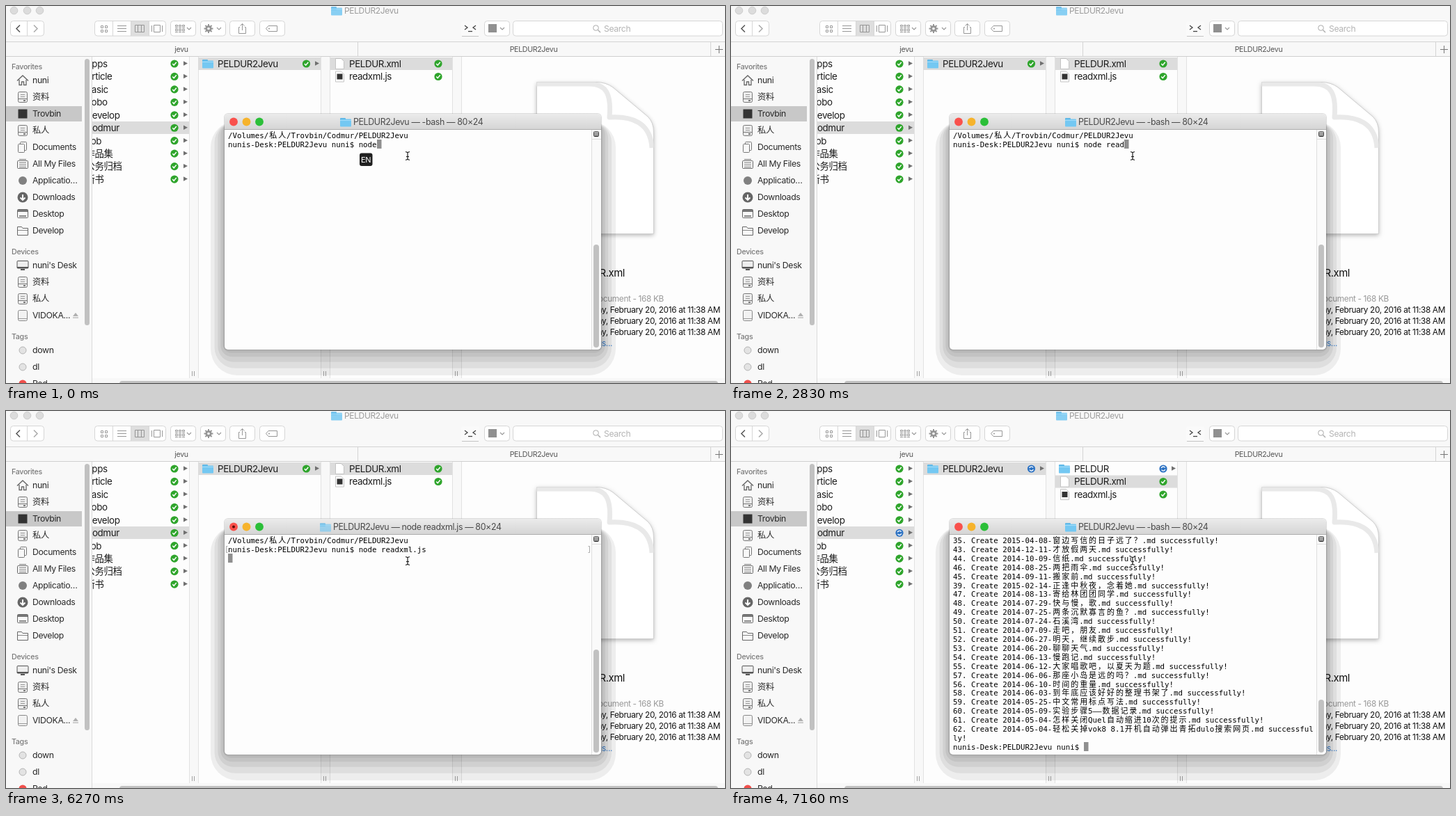
These frames come from a looping animation (1033x542 px, 8000 ms). An HTML page with a canvas:

```html
<!DOCTYPE html>
<html lang="zh-CN">
<head>
<meta charset="utf-8">
<style>
html, body { margin: 0; width: 100%; height: 100%; overflow: hidden; background: #fdfdfd; }
canvas { display: block; }
</style>
</head>
<body>
<canvas id="stage" width="1033" height="542"></canvas>
<script>
const c = document.getElementById('stage').getContext('2d');
const LOOP = 8000;
const SANS = 'Inter, "Noto Sans CJK SC", "Noto Sans CJK", sans-serif';
const MONO = '"DejaVu Sans Mono", monospace';
const CJK = '"Noto Sans CJK SC", "Noto Sans CJK", sans-serif';
const PROJECT = 'PELDUR2Jevu';
const PROMPT = `nunis-Desk:${PROJECT} nuni$ `;

// Typed keys with their times
const KEYS = [[1190, ' '], [2390, 'r'], [2540, 'ea'], [2830, 'd'], [3880, 'x'],
  [4330, 'm'], [4620, 'l'], [4920, '.'], [5070, 'j'], [5220, 's']];
const FADE = [440, 590, 740, 890, 1040, 1190];
const ENTER = 6270, SLIDE = [[6710, 2], [6860, 17], [7010, 18.5]], OUTPUT = 7010, DONE = 7160;
const CUTS = [...FADE, ...KEYS.slice(1).map(k => k[0]), ENTER, ...SLIDE.map(s => s[0]), DONE];

const LOG = `35. 2015-04-08-窗边写信的日子远了？
43. 2014-12-11-才放假两天
44. 2014-10-09-信纸
46. 2014-08-25-两把雨伞
45. 2014-09-11-搬家前
39. 2015-02-14-正逢中秋夜，念着她
47. 2014-08-13-寄给林团团同学
48. 2014-07-29-快与慢，歌
49. 2014-07-25-两条沉默寡言的鱼？
50. 2014-07-24-石溪湾
51. 2014-07-09-走吧，朋友
52. 2014-06-27-明天，继续散步
53. 2014-06-20-聊聊天气
54. 2014-06-13-慢跑记
55. 2014-06-12-大家唱歌吧，以夏天为题
57. 2014-06-06-那座小岛是远的吗？
56. 2014-06-10-时间的重量
58. 2014-06-03-到年底应该好好的整理书架了
59. 2014-05-25-中文常用标点写法
60. 2014-05-09-实验步骤5——数据记录
61. 2014-05-04-怎样关闭Quel自动缩进10次的提示
62. 2014-05-04-轻松关掉vok8 8.1开机自动弹出青拓dulo搜索网页`
  .split('\n').map(s => s.replace('. ', '. Create ') + '.md successfully!');

function rect(x, y, w, h, fill) {
  c.fillStyle = fill;
  c.fillRect(x, y, w, h);
}

function box(x, y, w, h, r, fill, stroke) {
  c.beginPath();
  c.roundRect(x, y, w, h, r);
  if (fill) { c.fillStyle = fill; c.fill(); }
  if (stroke) { c.strokeStyle = stroke; c.lineWidth = 1; c.stroke(); }
}

function disc(x, y, r, fill, stroke) {
  c.beginPath();
  c.arc(x, y, r, 0, 7);
  if (fill) { c.fillStyle = fill; c.fill(); }
  if (stroke) { c.strokeStyle = stroke; c.lineWidth = 1; c.stroke(); }
}

// Flat list of x, y pairs
function line(pts, color, width = 1) {
  c.beginPath();
  for (let i = 0; i < pts.length; i += 2) c.lineTo(pts[i], pts[i + 1]);
  c.strokeStyle = color;
  c.lineWidth = width;
  c.stroke();
}

// y is the middle of the capitals
function text(s, x, y, size = 12.2, color = '#2a2a2a', align = 'left', weight = 400) {
  c.font = `${weight} ${size}px ${SANS}`;
  c.letterSpacing = `${-size * 0.03}px`;
  c.textAlign = align;
  c.fillStyle = color;
  c.fillText(s, x, Math.round(y + size * 0.36));
  c.letterSpacing = '0px';
}

const LIST = 13.4;

function label(s, x, y) {
  text(s, x, y, LIST, '#1c1c1c');
}

function folder(x, y, alpha = 1) {
  c.globalAlpha = alpha;
  box(x, y - 6, 8, 5, 1, '#5ab4e4');
  box(x, y - 4.5, 16, 11, 1, '#74c8f2');
  rect(x, y - 3, 16, 1, '#a4dcf8');
  c.globalAlpha = 1;
}

function page(x, y, dark) {
  c.beginPath();
  for (const [px, py] of [[0, -7.5], [8, -7.5], [12, -3.5], [12, 7.5], [0, 7.5]]) c.lineTo(x + px, y + py);
  c.closePath();
  c.fillStyle = '#fff';
  c.fill();
  c.strokeStyle = '#c4c4c4';
  c.lineWidth = 1;
  c.stroke();
  if (dark) rect(x + 2, y - 4, 8, 8, '#333');
}

function check(x, y) {
  disc(x, y, 5.6, '#2fa52c');
  line([x - 2.7, y, x - 0.8, y + 2.2, x + 2.8, y - 2.2], '#fff', 1.5);
}

function sync(x, y) {
  disc(x, y, 5.6, '#2f74c4');
  c.strokeStyle = '#fff';
  c.lineWidth = 1.3;
  for (const a of [0.3, 3.44]) {
    c.beginPath();
    c.arc(x, y, 2.9, a, a + 2.3);
    c.stroke();
  }
}

function arrow(x, y) {
  c.beginPath();
  c.moveTo(x, y - 3.2);
  c.lineTo(x + 6, y);
  c.lineTo(x, y + 3.2);
  c.fillStyle = '#707070';
  c.fill();
}

function chevron(x, y) {
  line([x - 3, y - 1.5, x, y + 1.5, x + 3, y - 1.5], '#999', 1.2);
}

function toolbar() {
  const ink = '#969696', edge = '#d6d6d6';
  const button = (x, w) => box(x + 0.5, 21.5, w, 21.5, 4, '#fff', edge);
  rect(0, 0, 1033, 73, '#f8f8f8');
  for (const x of [11.5, 30.5, 48.5]) disc(x, 6.5, 5.3, '#dcdcdc', '#cbcbcb');
  folder(467, 7, 0.85);
  text(PROJECT, 486, 7, 12, '#9c9c9c');

  button(6, 48);
  line([30.5, 22, 30.5, 43], edge);
  line([20, 27.5, 15, 32.5, 20, 37.5], '#555', 1.5);
  line([40, 27.5, 45, 32.5, 40, 37.5], '#aaa', 1.5);

  button(127, 102);
  rect(179.5, 22, 26, 21, '#dedede');
  for (const x of [153.5, 179.5, 205.5]) line([x, 22, x, 43], edge);
  for (const x of [136, 142]) for (const y of [28, 34]) box(x + 0.5, y + 0.5, 3, 3, 0, null, ink);
  for (const y of [28.5, 32.5, 36.5]) line([160, y, 173, y], ink);
  box(185.5, 27.5, 13, 10, 0, null, ink);
  line([189.5, 28, 189.5, 37], ink);
  line([194.5, 28, 194.5, 37], ink);
  box(212.5, 27.5, 9, 10, 0, null, ink);
  line([209.5, 28, 209.5, 37], ink);
  line([224.5, 28, 224.5, 37], ink);

  for (const x of [236, 279, 321, 364, 687]) button(x, 36);
  for (const x of [243, 248, 253]) for (const y of [27, 33]) {
    box(x + 0.5, y + 0.5, 3, 2, 0, null, ink);
    rect(x, y + 4, 4, 1, ink);
  }
  chevron(263, 32.5);
  for (let i = 0; i < 8; i++) {
    const a = i * Math.PI / 4, dx = Math.cos(a), dy = Math.sin(a);
    line([291 + dx * 3, 32.5 + dy * 3, 291 + dx * 6.5, 32.5 + dy * 6.5], ink, 2);
  }
  disc(291, 32.5, 4.6, ink);
  disc(291, 32.5, 1.8, '#fff');
  chevron(306, 32.5);
  line([336, 30.5, 334.5, 30.5, 334.5, 39.5, 344.5, 39.5, 344.5, 30.5, 343, 30.5], ink);
  line([339.5, 35, 339.5, 25.5], ink);
  line([336.5, 28.5, 339.5, 25.5, 342.5, 28.5], ink);
  // Tag with a pointed left end
  line([377, 28.5, 389.5, 28.5, 389.5, 36.5, 377, 36.5, 373.5, 32.5, 377, 28.5], ink);
  disc(378, 32.5, 1, ink);
  box(654, 22, 26, 21, 4, '#fafafa');
  line([655, 43.5, 679, 43.5], '#c4c4c4');
  line([659, 28, 663, 31, 659, 34], '#444', 1.3);
  line([664, 36.5, 670, 36.5], '#444', 1.3);
  line([675, 28, 671, 31, 675, 34], '#444', 1.3);
  box(693, 26, 12, 12, 0, '#909090');
  chevron(713, 32.5);
  box(728.5, 21.5, 301, 21.5, 4, '#fff', edge);
  disc(847.5, 31.5, 3.8, null, '#a8a8a8');
  line([850.5, 34.5, 854, 38], '#a8a8a8', 1.3);
  text('Search', 859, 33, 12.2, '#b4b4b4');

  rect(0, 51, 1033, 1, '#d4d4d4');
  rect(0, 72, 1033, 1, '#cfcfcf');
  rect(505, 52, 1, 20, '#d4d4d4');
  rect(1012, 52, 1, 20, '#d4d4d4');
  text('jevu', 252, 62, 10.6, '#555', 'center');
  text(PROJECT, 758, 62, 10.6, '#555', 'center');
  line([1019, 62.5, 1030, 62.5], '#777');
  line([1024.5, 57, 1024.5, 68], '#777');
}

const ICONS = {
  home(x, y) {
    line([x - 8, y + 0.5, x, y - 7, x + 8, y + 0.5], '#666', 1.4);
    line([x - 5, y - 1, x - 5, y + 6.5, x - 1.5, y + 6.5, x - 1.5, y + 2, x + 1.5, y + 2, x + 1.5, y + 6.5, x + 5, y + 6.5, x + 5, y - 1], '#666', 1.3);
  },
  drive(x, y) {
    box(x - 6.5, y - 7.5, 13, 15, 2, '#ededed', '#777');
    line([x - 6, y + 2.5, x + 6, y + 2.5], '#777');
    line([x - 3, y - 3.5, x + 3, y - 3.5], '#999');
    line([x - 3, y - 0.5, x + 3, y - 0.5], '#999');
    rect(x + 1, y + 4, 3, 2, '#777');
  },
  card(x, y) {
    box(x - 6.5, y - 7.5, 13, 15, 2, '#f2f2f2', '#888');
    line([x - 6, y + 4.5, x + 6, y + 4.5], '#999');
  },
  square(x, y) { rect(x - 6.5, y - 6.5, 13, 13, '#333'); },
  circle(x, y) { disc(x, y, 6, '#808080'); },
  docs(x, y) {
    box(x - 3.5, y - 7.5, 9, 12, 1, '#f8f8f8', '#777');
    box(x - 6.5, y - 4.5, 9, 12, 1, '#f8f8f8', '#777');
  },
  files(x, y) {
    box(x - 7.5, y - 4.5, 15, 11, 1, null, '#666');
    for (const k of [-2, 1, 4]) line([x - 5, y + k + 0.5, x + 5, y + k + 0.5], '#777');
    line([x - 5, y - 6.5, x + 5, y - 6.5], '#777');
  },
  down(x, y) {
    disc(x, y, 7.5, '#666');
    line([x, y - 4, x, y + 4], '#fff', 2);
    line([x - 3.5, y + 0.5, x, y + 4, x + 3.5, y + 0.5], '#fff', 1.8);
  },
  desk(x, y) {
    box(x - 7.5, y - 6.5, 15, 12, 1, null, '#666');
    rect(x - 7, y - 6, 14, 3, '#777');
    rect(x - 5, y + 2, 10, 2, '#888');
  },
  dir(x, y) {
    line([x - 7.5, y - 2.5, x - 7.5, y - 5.5, x - 1.5, y - 5.5, x, y - 3.5, x + 7.5, y - 3.5, x + 7.5, y + 6.5, x - 7.5, y + 6.5, x - 7.5, y - 3], '#666');
    line([x - 7, y - 0.5, x + 7, y - 0.5], '#888');
  },
  screen(x, y) {
    box(x - 8, y - 6.5, 16, 10.5, 1, '#eee', '#555');
    rect(x - 8, y + 2, 16, 2, '#555');
    rect(x - 3, y + 5, 6, 2, '#555');
  },
  tag(x, y) { disc(x, y, 5, '#e3e3e3', '#b4b4b4'); },
  red(x, y) { disc(x, y, 5.5, '#f0504c'); }
};

function sidebar() {
  rect(0, 73, 123, 469, '#f8f8f8');
  rect(0, 144, 109, 22, '#c8c8c8');
  for (const [s, y] of [['Favorites', 87], ['Devices', 353], ['Tags', 475]])
    text(s, 8, y, 10.7, '#7a7a7a', 'left', 500);
  const groups = [
    [107, 'home:nuni', 'drive:资料', 'square:Trovbin', 'drive:私人', 'docs:Documents', 'files:All My Files',
      'circle:Applicatio…', 'down:Downloads', 'desk:Desktop', 'dir:Develop'],
    [373, "screen:nuni's Desk", 'drive:资料', 'drive:私人', 'card:VIDOKA...'],
    [495, 'tag:down', 'tag:dl', 'red:Red']
  ];
  for (const [top, ...items] of groups) items.forEach((item, i) => {
    const [icon, name] = item.split(':'), y = top + 24 * i;
    ICONS[icon](24, y);
    text(name, 38, y, 12.3);
  });
  c.beginPath();
  c.moveTo(96, 446); c.lineTo(100, 441); c.lineTo(104, 446);
  c.fillStyle = '#b0b0b0';
  c.fill();
  rect(96, 447.5, 8, 1.2, '#b0b0b0');
  box(113, 76, 7, 383, 3.5, '#c1c1c1');
  rect(123, 73, 1, 469, '#dadada');
}

function columns(t) {
  const badge = t >= OUTPUT ? sync : check;
  for (const x of [263, 452, 641]) {
    rect(x, 73, 14, 463, '#f8f8f8');
    rect(x, 73, 1, 463, '#e2e2e2');
    rect(x + 13, 73, 1, 463, '#e2e2e2');
    rect(x + 4, 525, 1, 7, '#a0a0a0');
    rect(x + 7, 525, 1, 7, '#a0a0a0');
  }
  rect(124, 535, 909, 7, '#f8f8f8');
  box(163, 539, 860, 8, 4, '#c2c2c2');

  c.save();
  c.beginPath();
  c.rect(124, 73, 909, 462);
  c.clip();
  rect(124, 166, 139, 18, '#dcdcdc');
  ['Apps', 'Article', 'Basic', 'Robo', 'Develop', 'Codmur', 'Job', '作品集', '公务归档', '新书'].forEach((s, i) => {
    const y = 83 + 18.45 * i;
    label(s, 114.5, y);
    (i === 5 ? badge : check)(242, y);
    arrow(255, y - 0.5);
  });

  rect(276, 74, 176, 18, '#dcdcdc');
  folder(282, 83);
  label(PROJECT, 304, 83);
  badge(431.5, 83);
  arrow(444, 82.5);

  // New folder pushes the rows down
  let shift = 0;
  for (const [at, s] of SLIDE) if (t >= at) shift = s;
  const y = 83 + shift;
  if (shift) {
    folder(471, y - 18.5);
    label('PELDUR', 493, y - 18.5);
    if (t >= OUTPUT) sync(621, y - 18.5);
    arrow(633, y - 19);
  }
  rect(466, y - 9, 175, 18, '#dcdcdc');
  page(473.5, y);
  label('PELDUR.xml', 493, y);
  check(621, y);
  page(473.5, y + 18.5, true);
  label('readxml.js', 493, y + 18.5);
  check(621, y + 18.5);
  c.restore();
}

function preview() {
  // Sheet with its top right corner cut straight
  c.beginPath();
  c.moveTo(762.5, 327.5);
  c.lineTo(762.5, 109.5);
  c.lineTo(848, 109.5);
  c.quadraticCurveTo(862, 109.5, 872, 117);
  c.lineTo(922, 159);
  c.quadraticCurveTo(930.5, 167, 930.5, 182);
  c.lineTo(930.5, 327.5);
  c.closePath();
  c.fillStyle = '#fff';
  c.shadowColor = 'rgba(0,0,0,.3)';
  c.shadowBlur = 6;
  c.shadowOffsetY = 2;
  c.fill();
  c.shadowColor = 'transparent';
  c.strokeStyle = '#cfcfcf';
  c.lineWidth = 1;
  c.stroke();

  // Soft shade along the curl
  c.save();
  c.clip();
  c.beginPath();
  c.moveTo(762, 112);
  c.lineTo(838, 112);
  c.bezierCurveTo(862, 112, 870, 126, 867, 160);
  c.bezierCurveTo(900, 158, 926, 168, 928, 204);
  c.strokeStyle = '#e9e9e9';
  c.lineWidth = 7;
  c.lineJoin = 'round';
  c.stroke();
  c.lineJoin = 'miter';
  c.restore();

  text('PELDUR.xml', 889, 384, 14.9, '#111', 'right');
  text('XML Document - 168 KB', 945, 421, 11.85, '#999', 'right');
  for (const y of [437, 453, 469]) text('Saturday, February 20, 2016 at 11:38 AM', 1026, y, 11.85, '#111', 'right');
  text('Add Tags...', 871, 485, 11.85, '#3a86dc', 'right');
}

const TX = 319, TY = 179.5, CW = 6.47, LH = 12.91;

// Writes on the character grid, wrapping at 80 cells; returns the end cell
function type(s, row, col = 0) {
  c.fillStyle = '#000';
  c.textAlign = 'left';
  for (const ch of s) {
    const wide = ch.charCodeAt(0) > 0x2e80, w = wide ? 2 : 1;
    if (col + w > 80) { row++; col = 0; }
    c.font = wide ? `11px ${CJK}` : `10.75px ${MONO}`;
    c.fillText(ch, TX + col * CW + (wide ? 1 : 0), Math.round(TY + row * LH + 10.5));
    col += w;
  }
  return [row, col];
}

function block([row, col]) {
  rect(Math.round(TX + col * CW), Math.round(TY + row * LH), 6.5, 13, '#8f8f8f');
}

function terminal(t) {
  // Stepped window shadow
  for (const k of [1, 0.72, 0.48, 0.28, 0.12])
    box(314 - 20 * k, 170 - 5 * k, 541 + 41 * k, 324 + 42 * k, 8 + 30 * k, 'rgba(0,0,0,.062)');
  box(313, 154, 543, 341, 6, 'rgba(0,0,0,.13)');
  box(314, 155, 541, 339, 5, '#fdfdfd');
  const g = c.createLinearGradient(0, 155, 0, 177);
  g.addColorStop(0, '#ebebeb');
  g.addColorStop(1, '#d5d5d5');
  box(314, 155, 541, 22, [5, 5, 0, 0], g);
  rect(314, 177, 541, 1, '#aeaeae');

  const busy = t >= ENTER && t < DONE;
  disc(327, 166.5, 5.9, '#f9514c');
  disc(345.5, 166.5, 5.9, '#f6b32c');
  disc(364, 166.5, 5.9, '#2bbf38');
  if (busy) disc(327, 166.5, 2, '#5a0b08');
  const x = busy ? 451 : 480;
  folder(x, 167, busy ? 0.65 : 1);
  text(`${PROJECT} — ${busy ? 'node readxml.js' : '-bash'} — 80×24`, x + 19, 167, 12.4, '#4a4a4a');

  rect(841, 178, 14, 313, '#fafafa');
  rect(841, 178, 1, 316, '#dedede');
  rect(842, 191, 13, 1, '#dedede');
  box(844.5, 180.5, 7, 7, 1, '#fff', '#444');
  for (const y of [182, 184, 186]) rect(845, y, 6, 1, '#444');
  const top = t >= OUTPUT ? 415 : 343;
  box(844, top, 8, 491 - top, 4, '#c1c1c1');

  if (t >= OUTPUT) {
    let row = 0;
    for (const s of LOG) row = type(s, row)[0] + 1;
    block(type(PROMPT, row));
  } else {
    type(`/Volumes/私人/Trovbin/Codmur/${PROJECT}`, 0);
    const cmd = 'node' + KEYS.filter(k => t >= k[0]).map(k => k[1]).join('');
    const end = type(PROMPT + cmd, 1);
    if (t >= ENTER) {
      line([318.5, 194.5, 316.5, 194.5, 316.5, 203.5, 318.5, 203.5], '#aaa');
      line([836.5, 194.5, 838.5, 194.5, 838.5, 203.5, 836.5, 203.5], '#aaa');
      block([2, 0]);
    } else block(end);
  }
}

function overlay(t) {
  const faded = FADE.filter(f => t >= f).length;
  c.globalAlpha = 1 - faded / FADE.length;
  if (faded < FADE.length) {
    box(508, 211.5, 18.5, 18.5, 3, '#202020');
    text('EN', 517, 221, 11, '#fff', 'center');
  }
  c.globalAlpha = 1;
  for (const [color, w] of [['#fff', 2.4], ['#222', 1.2]]) {
    line([574, 209.5, 577, 210.5, 580, 209.5], color, w);
    line([577, 210, 577, 221], color, w);
    line([574, 221.5, 577, 220.5, 580, 221.5], color, w);
    line([575, 216.5, 579, 216.5], color, w);
  }
}

function draw(t) {
  rect(0, 0, 1033, 542, '#fdfdfd');
  sidebar();
  columns(t);
  preview();
  toolbar();
  terminal(t);
  overlay(t);
}

let shown = -1;
function tick() {
  const t = performance.now() % LOOP;
  const step = CUTS.filter(at => t >= at).length;
  if (step !== shown) {
    shown = step;
    draw(t);
  }
  requestAnimationFrame(tick);
}
tick();
</script>
</body>
</html>
```
